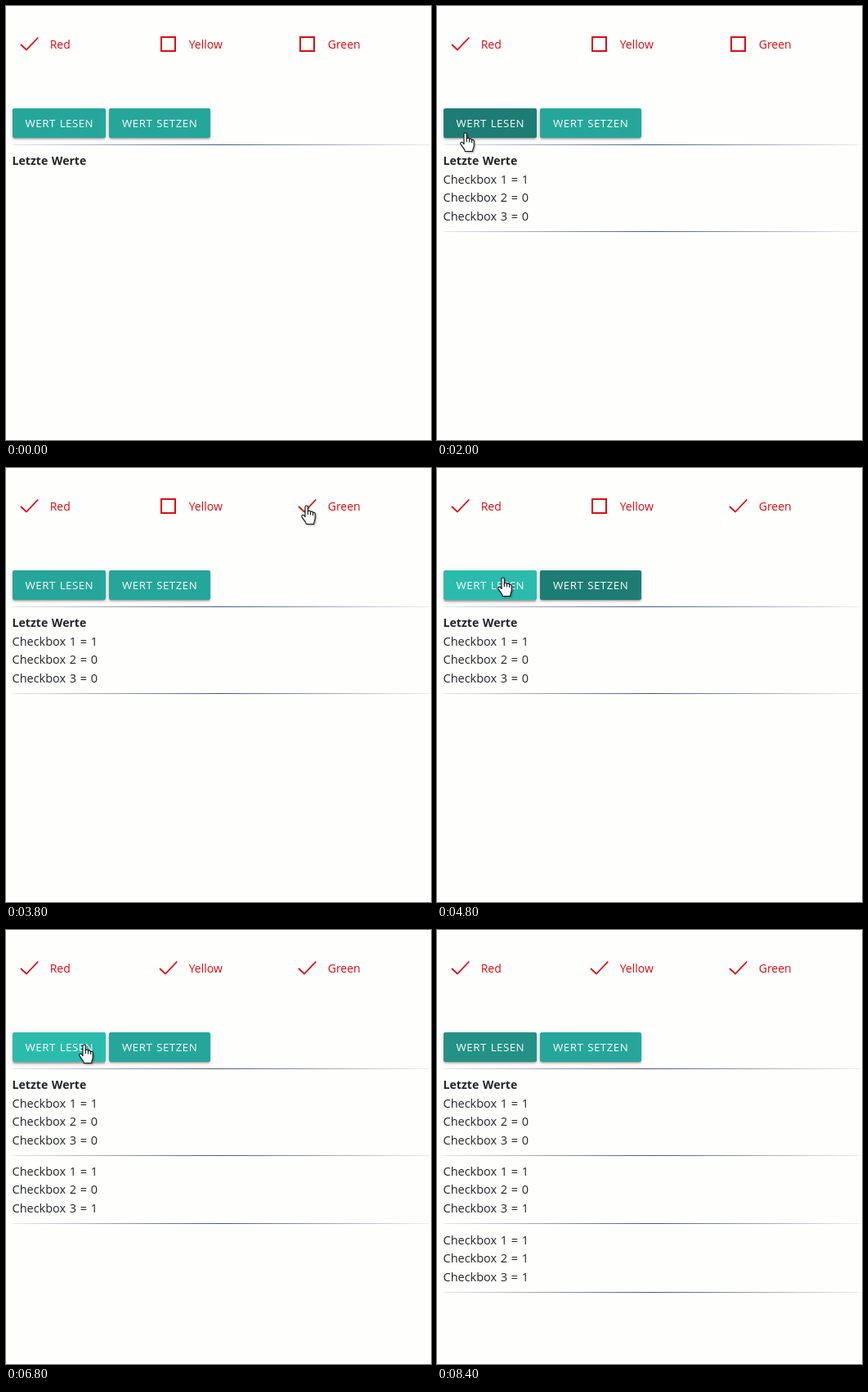
An HTML page for the animation above (8600 ms loop, 520x530 px).

```html
<!DOCTYPE html>
<html lang="de">
<head>
<meta charset="utf-8">
<title>Checkbox</title>
<style>
  html, body { margin: 0; width: 100%; height: 100%; overflow: hidden; background: #fefefd; }
  body { position: relative; }
  svg { position: absolute; left: 0; top: 0; display: block; }
  text { font-family: "Open Sans", "Noto Sans", sans-serif; font-size: 14.5px; word-spacing: .9px; fill: #212529; }
  .label { font-size: 14px; fill: #de0a12; }
  .caption { font-size: 13.3px; font-weight: 500; letter-spacing: .5px; fill: #fff; }
  .title { font-size: 14.1px; font-weight: 700; }
  .box, .tick { fill: none; stroke: #de0a12; stroke-width: 2; }
  .tick { stroke-width: 1.8; }
  .btn {
    position: absolute; top: 125px; height: 36px; border-radius: 2px; background: #26a69a;
    box-shadow: 0 2px 2px rgba(0,0,0,.14), 0 3px 1px -2px rgba(0,0,0,.12), 0 1px 5px rgba(0,0,0,.2);
  }
  .btn.hover {
    background: #2bbbad;
    box-shadow: 0 3px 3px rgba(0,0,0,.14), 0 1px 7px rgba(0,0,0,.12), 0 3px 1px -1px rgba(0,0,0,.2);
  }
  .btn.focus { background: #1d7d74; }
  .btn.focus.fading { background: #249186; }
  #read { left: 8px; width: 114px; }
  #write { left: 126px; width: 124px; }
  #cursor { filter: drop-shadow(1.5px 1.5px 1px rgba(0,0,0,.4)); }
  #cursor path { fill: #fff; stroke: #111; stroke-width: 1.1; stroke-linejoin: round; }
  #cursor .crease { fill: none; }
</style>
</head>
<body>
<div class="btn" id="read"></div>
<div class="btn" id="write"></div>
<svg width="520" height="530" viewBox="0 0 520 530">
  <defs>
    <linearGradient id="fade" stop-color="#2c3c68">
      <stop offset="0" stop-color="#2c3c68" stop-opacity=".12"/>
      <stop offset=".5" stop-color="#2c3c68" stop-opacity=".85"/>
      <stop offset="1" stop-color="#2c3c68" stop-opacity=".08"/>
    </linearGradient>
  </defs>
  <g id="boxes"></g>
  <text class="caption" x="23.5" y="148">WERT LESEN</text>
  <text class="caption" x="142" y="148">WERT SETZEN</text>
  <rect x="8" y="169" width="510" height="1" fill="url(#fade)"/>
  <text class="title" x="7.5" y="194">Letzte Werte</text>
  <g id="log"></g>
  <g id="cursor">
    <path id="arrow" d="M0 0V16.5L3.8 13L6.4 19L9.2 17.8L6.6 12H12Z"/>
    <g id="hand">
      <path d="M-2 1.5C-2 -.5 1.3 -.5 1.3 1.5V7C2 5.8 4.3 6 4.5 7.6C5.3 6.6 7.4 7 7.6 8.6C8.6 7.8 10.2 8.4 10.2 10V15.5C10.2 18 8.6 19 8.6 22.5H-.6C-.6 20 -4 17.5 -6 13.6C-7 11.5 -4.6 10.5 -3.4 12L-2 13.6Z"/>
      <path class="crease" d="M1.3 7V11M4.5 7.6V11.5M7.6 8.6V12"/>
    </g>
  </g>
</svg>
<script>
  const LOOP = 8600, STEP = 200, ENTER = 200, FADE = 8400;
  const $ = id => document.getElementById(id);
  const show = (el, on) => { el.style.display = on ? "" : "none"; };

  const names = ["Red", "Yellow", "Green"];
  const boxX = i => 18 + 170 * i;

  // the pointer's visits; it glides in a straight line from one to the next
  const visits = [
    { leave: ENTER, x: 416, y: 400 },
    { id: "read", arrive: 1000, click: 1400, leave: 2400, x: 35, y: 155 },
    { id: "Green", arrive: 3000, click: 3600, leave: 3800, x: 368, y: 46 },
    { id: "write", arrive: 4200, click: 4400, leave: 4400, x: 190, y: 143 },
    { id: "read", arrive: 4700, click: 5000, leave: 5400, x: 81, y: 134 },
    { id: "Yellow", arrive: 5900, click: 6200, leave: 6200, x: 201, y: 46 },
    { id: "read", arrive: 6600, click: 7000, leave: 7400, x: 96, y: 140 },
    { arrive: 7800, leave: 7800, x: 245, y: 465 }
  ];
  const clicksBy = t => visits.filter(v => v.click <= t);
  const ticked = (name, t) => name === "Red" || clicksBy(t).some(v => v.id === name);

  $("boxes").innerHTML = names.map((name, i) => `
    <rect class="box" x="${boxX(i) + 2}" y="38" width="17" height="17"/>
    <path class="tick" d="M${boxX(i)} 47l7 6.5l14.3 -15"/>
    <text class="label" x="${boxX(i) + 35.7}" y="52">${name}</text>`).join("");
  const squares = document.querySelectorAll(".box");
  const ticks = document.querySelectorAll(".tick");

  // every reading adds a block with the state of all boxes
  const readings = visits.filter(v => v.id === "read");
  $("log").innerHTML = readings.map((v, n) => {
    const top = Math.floor(217 + 83.5 * n);
    const rows = names.map((name, i) =>
      `<text x="7.5" y="${top + Math.round(i * 22.4)}">Checkbox ${i + 1} = ${+ticked(name, v.click)}</text>`);
    return `<g>${rows.join("")}<rect x="8" y="${top + 58}" width="510" height="1" fill="url(#fade)"/></g>`;
  }).join("");
  const blocks = $("log").children;

  function tipAt(t) {
    const i = visits.findIndex(v => v.leave >= t);
    if (t < ENTER || i < 0) return null;
    const to = visits[i], from = visits[i - 1] || to;
    const k = i ? Math.min(1, (t - from.leave) / (to.arrive - from.leave)) : 1;
    const mix = axis => Math.round(from[axis] + (to[axis] - from[axis]) * k);
    return { x: mix("x"), y: mix("y") };
  }

  // name of the control below the pointer
  function hit(tip) {
    if (!tip) return null;
    const { x, y } = tip;
    if (y >= 125 && y <= 161) {
      if (x >= 8 && x <= 122) return "read";
      if (x >= 126 && x <= 250) return "write";
    }
    if (y >= 34 && y <= 60) return names.find((_, i) => x >= boxX(i) && x <= boxX(i) + 80);
    return null;
  }

  function draw(t) {
    names.forEach((name, i) => {
      show(squares[i], !ticked(name, t));
      show(ticks[i], ticked(name, t));
    });
    readings.forEach((v, i) => show(blocks[i], t >= v.click + STEP));

    const tip = tipAt(t), over = hit(tip);
    const settled = hit(tipAt(t - STEP)) === over;
    const focused = clicksBy(t).pop()?.id;
    for (const id of ["read", "write"]) {
      const list = $(id).classList;
      list.toggle("focus", focused === id);
      list.toggle("hover", over === id && settled && focused !== id);
      list.toggle("fading", t >= FADE);
    }

    show($("cursor"), tip);
    if (!tip) return;
    show($("hand"), over);
    show($("arrow"), !over);
    $("cursor").setAttribute("transform", `translate(${tip.x} ${tip.y})`);
  }

  const start = performance.now();
  function tick() {
    const t = (performance.now() - start) % LOOP;
    draw(Math.floor(t / STEP) * STEP);
    requestAnimationFrame(tick);
  }
  tick();
</script>
</body>
</html>
```
